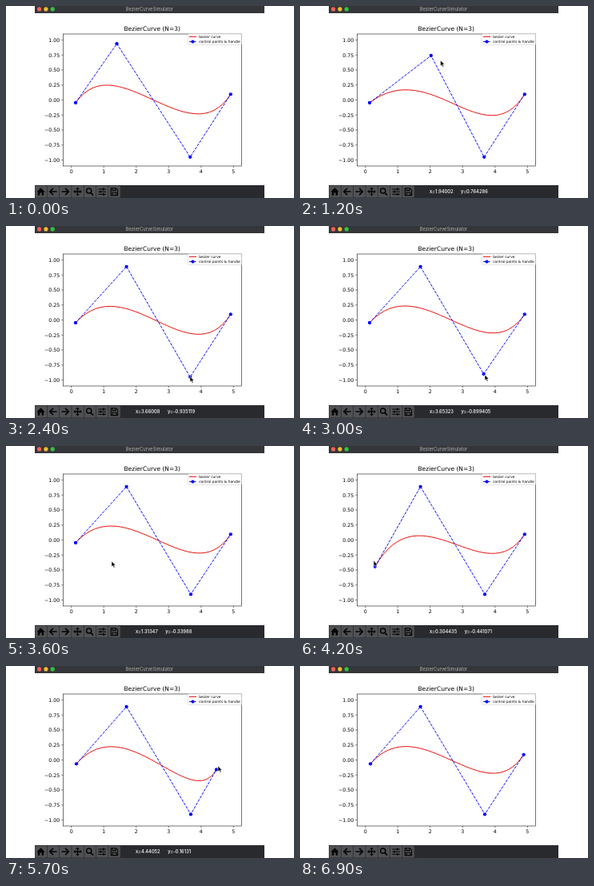
An HTML page for the animation above (7.2 s loop, 360 by 240 pixels).

```html
<!DOCTYPE html>
<html lang="en">
<head>
<meta charset="utf-8">
<title>Bezier curve</title>
<style>
  html, body { margin: 0; width: 100%; height: 100%; overflow: hidden; background: #fff; }
  svg { display: block; width: 100vw; height: 100vh; }
  .plot { font-family: "DejaVu Sans", sans-serif; font-size: 6.27px; }
  .ui { font-family: Inter, sans-serif; font-size: 5.8px; }
  .legend { font-size: 4.42px; }
  .handle { fill: none; stroke: #00f; stroke-width: .95; stroke-dasharray: 3.5 1.5; }
  .curve { fill: none; stroke: #e8110c; stroke-width: 1; }
  .icons { fill: none; stroke: #050505; stroke-width: 1.7; }
</style>
</head>
<body>
<svg viewBox="0 0 360 240">
  <rect width="360" height="240" fill="#fff"/>

  <g class="ui">
    <rect x="36" width="287" height="9" fill="#353639"/>
    <circle cx="41.6" cy="3.9" r="2.6" fill="#fb5f57"/>
    <circle cx="49.9" cy="3.9" r="2.6" fill="#f6bb31"/>
    <circle cx="58.2" cy="3.9" r="2.6" fill="#2fc441"/>
    <text x="179.5" y="6.1" text-anchor="middle" fill="#b2b3b4" textLength="">BezierCurveSimulator</text>
    <rect x="36" y="224" width="287" height="16" fill="#292a2d"/>
    <g id="buttons" fill="#505154"></g>
    <g class="icons">
      <path d="M43.5 227.3L38.4 232.3H39.8V236.8H42.3V233.6H44.7V236.8H47.2V232.3H48.6Z" fill="#050505" stroke="none"/>
      <path d="M63.6 232H55M59 227.8L54.9 232L59 236.2"/>
      <path d="M69.6 232H78.2M74.2 227.8L78.3 232L74.2 236.2"/>
      <path d="M85 232H94M89.5 227.5V236.5" stroke-width="1.4"/>
      <path d="M84 232l2.6-2.3v4.6zM95 232l-2.6-2.3v4.6zM89.5 226.5l-2.3 2.6h4.6zM89.5 237.5l-2.3-2.6h4.6z" fill="#050505" stroke="none"/>
      <circle cx="103.7" cy="231" r="3.1" stroke-width="1.5"/>
      <path d="M106 233.4L109 236.6"/>
      <path d="M115.3 229H125M115.3 232.2H125M115.3 235.4H125" stroke-width="1"/>
      <path d="M121.7 227.6v2.8M118 230.8v2.8M122 234v2.8" stroke-width="1.6"/>
      <path d="M131.2 227.7H137.4L139.6 229.9V236.6H131.2ZM133 228V230.6H137V228M133 236.3V233.2H138V236.3" stroke-width="1.1"/>
    </g>
    <text id="coords" y="234.1" fill="#fff" font-weight="500"><tspan x="162"></tspan><tspan dx="9.5"></tspan></text>
  </g>

  <g class="plot">
    <text x="182.7" y="31" text-anchor="middle" font-size="7.5">BezierCurve (N=3)</text>
    <g id="labels"></g>
    <path id="ticks" stroke="#000" stroke-width=".5"/>
    <path id="curve" class="curve"/>
    <path id="handle" class="handle"/>
    <g id="dots" fill="#00f"></g>
    <rect x="71.5" y="35" width="223" height="165" fill="none" stroke="#000" stroke-width=".55"/>
    <rect x="227.4" y="34.8" width="67.1" height="13.8" rx=".9" fill="#fff" fill-opacity=".85" stroke="#ccc" stroke-width=".55"/>
    <path class="curve" d="M229 38.4H238"/>
    <path class="handle" d="M229 44.6H238"/>
    <circle cx="233.5" cy="44.6" r="2.1" fill="#00f"/>
    <g class="legend">
      <text x="241.2" y="40">bezier curve</text>
      <text x="241.2" y="46.2">control points &amp; handle</text>
    </g>
  </g>

  <path id="cursor" d="M0 0V7L1.6 5.5L2.8 8.2L4 7.7L2.9 5.1H5Z" fill="#000" stroke="#fff" stroke-width=".5"/>
</svg>

<script>
const NS = 'http://www.w3.org/2000/svg';
const el = id => document.getElementById(id);
const add = (parent, tag, attrs, text = '') => {
  const node = document.createElementNS(NS, tag);
  for (const key in attrs) node.setAttribute(key, attrs[key]);
  node.textContent = text;
  return parent.appendChild(node);
};
const toX = x => 71.5 + (x + .25) * 223 / 5.5;
const toY = y => 117.5 - y * 75;

for (let i = 0; i < 7; i++)
  add(el('buttons'), 'rect', { x: 36.4 + i * 15.3, y: 224.8, width: 14.6, height: 14.6, rx: .6 });

let ticks = '';
for (let x = 0; x <= 5; x++) {
  ticks += `M${toX(x)} 200v2.2`;
  add(el('labels'), 'text', { x: toX(x), y: 209.4, 'text-anchor': 'middle' }, x);
}
for (let y = -1; y <= 1; y += .25) {
  ticks += `M71.5 ${toY(y)}h-2.2`;
  add(el('labels'), 'text', { x: 67.2, y: toY(y) + 2.3, 'text-anchor': 'end' }, y.toFixed(2).replace('-', '\u2212'));
}
el('ticks').setAttribute('d', ticks);

const STEP = 300, COUNT = 24;
const start = [[87, 121], [138.5, 47.2], [230.2, 188.8], [280.8, 110.4]];
// Per step: cursor pixel, readout in data units, dragged point [index, x, y]
const moves = {
  1: { cursor: [290, 224] },
  2: { cursor: [139, 48], read: [1.41379, .934524] },
  3: { cursor: [150, 53], read: [1.61089, .883333], drag: [1, 147.5, 52] },
  4: { cursor: [175.6, 68], read: [1.94002, .764286], drag: [1, 163.8, 62] },
  5: { cursor: [162, 58], read: [2.01361, .805952], drag: [1, 163, 58] },
  6: { cursor: [150.6, 50.8], read: [1.7127, .883333], drag: [1, 150.6, 50.8] },
  7: { cursor: [196, 126], read: [2.72137, -.0184524] },
  8: { cursor: [230, 188], read: [3.66008, -.935119] },
  9: { cursor: [227, 177], read: [3.59316, -.810119], drag: [2, 227, 178] },
  10: { cursor: [231, 186], read: [3.65323, -.899405], drag: [2, 229.6, 185] },
  11: { cursor: [231, 185.5], read: [3.68667, -.905357], drag: [2, 231, 185.4] },
  12: { cursor: [132, 144], read: [1.31347, -.33988] },
  13: { cursor: [90, 136], read: [.197369, -.226786], drag: [0, 90, 135] },
  14: { cursor: [92, 143.3], read: [.304435, -.441071], drag: [0, 93.9, 150.8] },
  15: { cursor: [88.5, 126], read: [.204057, -.167262], drag: [0, 89, 128] },
  16: { cursor: [88, 122], read: [.157213, -.0660714], drag: [0, 88, 122.3] },
  17: { cursor: [280, 111], read: [4.89501, .0946429] },
  18: { cursor: [264, 139], read: [4.50074, -.285714], drag: [3, 264, 138.5] },
  19: { cursor: [265, 125], read: [4.44052, -.16131], drag: [3, 263, 129.5] },
  20: { cursor: [280, 111], read: [4.87496, .0886905], drag: [3, 279.6, 110.8] },
  21: { cursor: [314, 219] }
};

const dots = start.map(() => add(el('dots'), 'circle', { r: 2.15 }));
const [readX, readY] = el('coords').children;
const format = value => String(+value.toPrecision(6));

function render(step) {
  const points = start.slice();
  for (let i = 0; i <= step; i++) {
    const drag = moves[i]?.drag;
    if (drag) points[drag[0]] = drag.slice(1);
  }
  const [a, ...rest] = points.map(p => p.join(' '));
  el('curve').setAttribute('d', `M${a}C${rest.join(' ')}`);
  el('handle').setAttribute('d', `M${a}L${rest.join(' ')}`);
  dots.forEach((dot, i) => {
    dot.setAttribute('cx', points[i][0]);
    dot.setAttribute('cy', points[i][1]);
  });

  const { cursor, read } = moves[step] || {};
  el('cursor').setAttribute('visibility', cursor ? 'visible' : 'hidden');
  if (cursor) el('cursor').setAttribute('transform', `translate(${cursor})`);
  readX.textContent = read ? 'x=' + format(read[0]) : '';
  readY.textContent = read ? 'y=' + format(read[1]) : '';
}

const origin = performance.now();
let shown = -1;
function tick() {
  const step = Math.floor((performance.now() - origin) / STEP) % COUNT;
  if (step !== shown) render(shown = step);
  requestAnimationFrame(tick);
}
tick();
</script>
</body>
</html>
```
